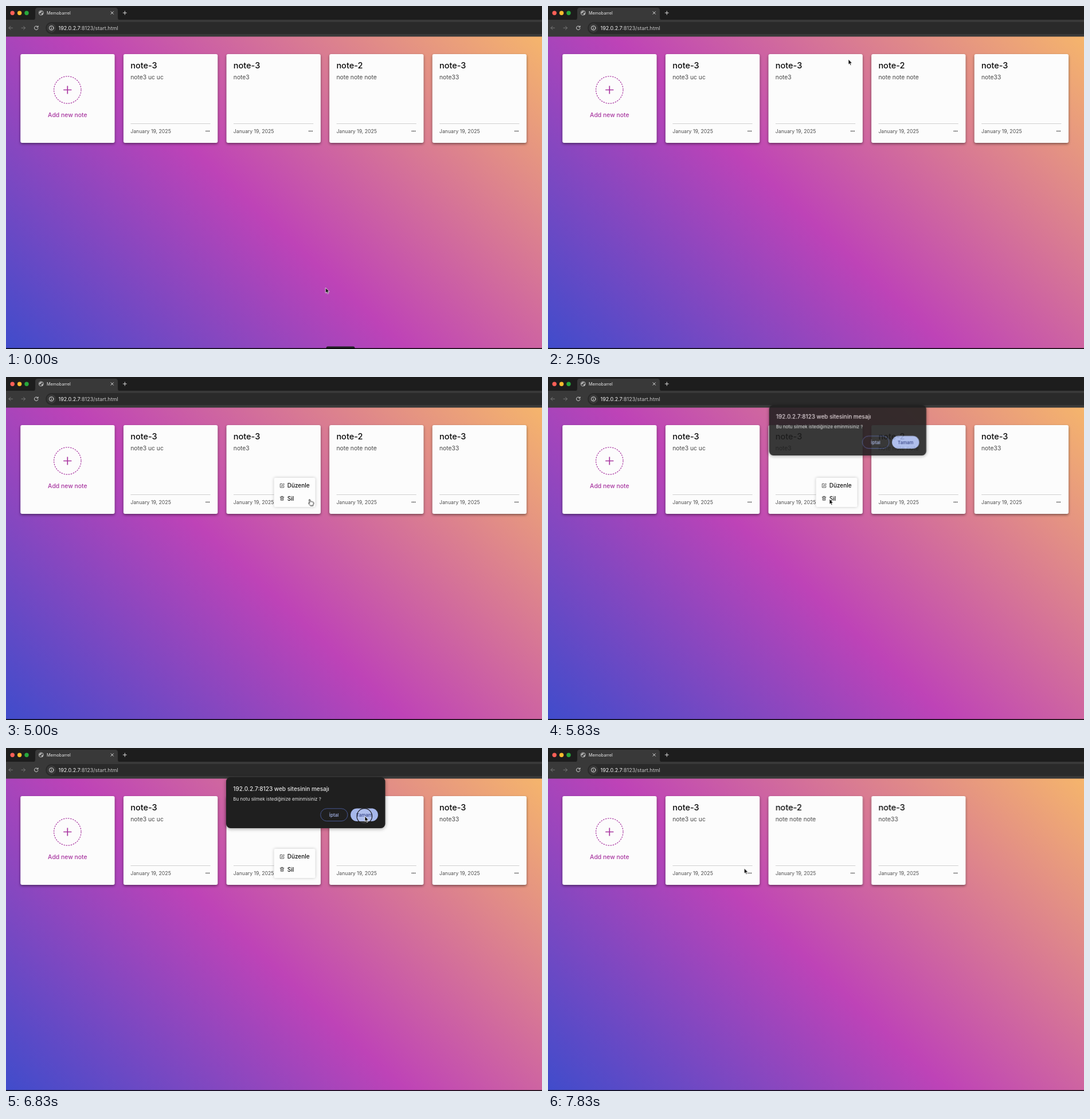
These frames come from a looping animation (935x599 px, 8 s). An HTML page:

```html
<!DOCTYPE html>
<html lang="tr">
<head>
<meta charset="utf-8">
<title>Memobarrel</title>
<style>
html, body { margin: 0; width: 100%; height: 100%; overflow: hidden; background: #050505; }
.page {
  position: absolute; left: 0; top: 53px; width: 935px; height: 545px;
  background: linear-gradient(43deg, #404ccb 0%, #be43b7 46%, #f5b56c 100%);
}
svg.stage { position: absolute; left: 0; top: 0; width: 935px; height: 599px; display: block; }
text { font-family: Inter, Roboto, "Noto Sans", sans-serif; }

/* Browser frame */
.tab { font-size: 7.3px; fill: #e6e6e6; }
.url { font-size: 9px; fill: #c4c4c4; }
.url .host { fill: #f2f2f2; }
.icon { fill: none; stroke: #dcdcdc; stroke-width: 1; stroke-linecap: round; stroke-linejoin: round; }
.dim { stroke: #777; }

/* Cards */
.paper { fill: #fcfcfc; filter: drop-shadow(0 2px 2px rgba(0, 0, 0, .45)); }
.title { font-size: 14.5px; font-weight: 500; fill: #0a0a0a; }
.body { font-size: 10.3px; fill: #484848; }
.date { font-size: 8.7px; fill: #4e4e4e; }
.add { font-size: 10.4px; font-weight: 500; fill: #a836a0; text-anchor: middle; }
.plus { fill: none; stroke: #a836a0; }

/* Menu */
.sheet { fill: #fdfdfd; filter: drop-shadow(0 0 2.5px rgba(0, 0, 0, .22)); }
.item { font-size: 10px; font-weight: 500; fill: #111; }
.mini { fill: none; stroke: #333; stroke-width: .8; stroke-linejoin: round; stroke-linecap: round; }

/* Dialog */
.box { fill: #1f1f1f; filter: drop-shadow(0 1px 3px rgba(0, 0, 0, .4)); }
.head { font-size: 10px; font-weight: 500; fill: #e4e4e4; }
.ask { font-size: 8px; fill: #e4e4e4; }
.btn { font-size: 8px; font-weight: 500; text-anchor: middle; }

/* Motion: 48 ticks per loop, a tick is 2.0833% */
.dock, .gone, .shift, .menu, .dialog, .move, .arrow, .hand, .ring {
  animation: 8s step-end -4ms infinite;
}
.dock { animation-name: dock; }
.gone { animation-name: gone; }
.shift { animation-name: shift; }
.menu { animation-name: menu; }
.dialog { animation-name: dialog; transform-origin: 523px 95px; }
.move { animation-name: move; }
.arrow { animation-name: arrow; }
.hand { animation-name: hand; }
.ring { animation-name: ring; }

@keyframes dock { 0% { opacity: 1 } 2.0833%, 100% { opacity: 0 } }
@keyframes gone { 0% { opacity: 1 } 87.5%, 100% { opacity: 0 } }
@keyframes shift {
  0% { transform: translate(0, 0) }
  87.5%, 100% { transform: translate(-179.6px, 0) }
}
@keyframes menu { 0% { opacity: 0 } 60.4167% { opacity: 1 } 87.5%, 100% { opacity: 0 } }
@keyframes dialog {
  0% { opacity: 0; transform: none }
  72.9167% { opacity: .89; transform: translate(0, -2.5px) scale(.988) }
  75% { opacity: 1; transform: none }
  87.5%, 100% { opacity: 0; transform: none }
}
@keyframes move {
  0% { transform: translate(557.5px, 492px) }
  31.25% { transform: translate(524px, 93px); animation-timing-function: steps(2) }
  35.4167% { transform: translate(529px, 168px); animation-timing-function: steps(3) }
  41.6667% { transform: translate(535px, 208px) }
  47.9167% { transform: translate(533px, 213px) }
  50% { transform: translate(531.3px, 217.5px) }
  60.4167% { transform: translate(530.5px, 215.5px) }
  62.5% { transform: translate(529.5px, 213.5px); animation-timing-function: steps(3) }
  68.75% { transform: translate(491px, 213px) }
  72.9167% { transform: translate(491px, 213px); animation-timing-function: steps(3) }
  79.1667% { transform: translate(626px, 119px) }
  87.5% { transform: translate(626px, 119px); animation-timing-function: steps(4) }
  95.8333% { transform: translate(342px, 205px) }
  97.9167%, 100% { transform: translate(342.3px, 210px) }
}
@keyframes arrow { 0% { opacity: 1 } 50% { opacity: 0 } 72.9167%, 100% { opacity: 1 } }
@keyframes hand { 0% { opacity: 0 } 50% { opacity: 1 } 72.9167%, 100% { opacity: 0 } }
@keyframes ring {
  0% { opacity: 0 }
  58.3333% { opacity: 1 }
  60.4167% { opacity: 0 }
  70.8333% { opacity: 1 }
  72.9167% { opacity: 0 }
  83.3333% { opacity: 1 }
  87.5%, 100% { opacity: 0 }
}
</style>
</head>
<body>
<div class="page"></div>
<svg class="stage" viewBox="0 0 935 599">
  <defs>
    <g id="paper"><rect class="paper" width="164.4" height="155" rx="3"/></g>
    <g id="note">
      <use href="#paper"/>
      <path d="M12.5 121.5H151.7" stroke="#c6c6c6" stroke-width=".8"/>
      <text class="date" x="12.3" y="138">January 19, 2025</text>
      <g fill="#505050">
        <circle cx="144.3" cy="134.5" r=".95"/>
        <circle cx="146.9" cy="134.5" r=".95"/>
        <circle cx="149.5" cy="134.5" r=".95"/>
      </g>
    </g>
  </defs>

  <!-- Browser frame -->
  <rect width="935" height="25" fill="#1d1d1d"/>
  <rect y="24" width="935" height="29.5" fill="#393939"/>
  <path d="M47 24.5Q51 24.5 51 20V7.500Q51 3 55.500 3H190.500Q195 3 195 7.500V20Q195 24.500 199 24.500Z" fill="#393939"/>
  <circle cx="11.200" cy="12.200" r="3.700" fill="#ff5f57"/>
  <circle cx="23.600" cy="12.200" r="3.700" fill="#febc2e"/>
  <circle cx="36" cy="12.200" r="3.700" fill="#28a93c"/>
  <circle cx="61.300" cy="12" r="4" fill="#4a4a4a" stroke="#bdbdbd" stroke-width=".9"/>
  <path d="M58 11Q60 8.500 62.500 8.800Q62.500 11 60.500 11.500Q60 13 58 12.500ZM62 13Q64 12 65 12.500Q64.500 15 62 15.500Z" fill="#bdbdbd"/>
  <text class="tab" x="71" y="14.500">Memobarrel</text>
  <path class="icon" d="M183 9.800l4.400 4.400m0-4.400l-4.400 4.400M204.300 12h6M207.300 9v6"/>
  <path class="icon dim" d="M11.500 38.300H5M8 35.300L5 38.300L8 41.300M27 38.300H33.500M30.500 35.300L33.500 38.300L30.500 41.300"/>
  <path class="icon" d="M55.600 36.500A3.300 3.300 0 1 0 56 39.200M56 34.800V37H53.800"/>
  <path d="M935 28H79.500a10.500 10.500 0 0 0 0 21H935Z" fill="#2a2a2a"/>
  <circle cx="79.200" cy="38.400" r="8" fill="#393939"/>
  <circle class="icon" cx="79.200" cy="38.400" r="3.700" stroke-width=".9"/>
  <path class="icon" d="M79.200 38.300v2M79.200 36.500v.1"/>
  <text class="url" x="91.500" y="41.600"><tspan class="host">192.0.2.7</tspan>:8123/start.html</text>

  <!-- Cards -->
  <g transform="translate(25.200 84)">
    <use href="#paper"/>
    <circle class="plus" cx="82.100" cy="62.500" r="23.700" stroke-width="1.200" stroke-dasharray="2.500 1.640"/>
    <path class="plus" d="M75 62.500h14.200M82.100 55.400v14.200" stroke-width="1.700"/>
    <text class="add" x="82.200" y="110">Add new note</text>
  </g>
  <g transform="translate(204.900 84)">
    <use href="#note"/>
    <text class="title" x="12.300" y="24.600">note-3</text>
    <text class="body" x="12.300" y="44">note3 uc uc</text>
  </g>
  <g class="gone">
    <g transform="translate(384.500 84)">
      <use href="#note"/>
      <text class="title" x="12.300" y="24.600">note-3</text>
      <text class="body" x="12.300" y="44">note3</text>
    </g>
  </g>
  <g class="shift">
    <g transform="translate(564.100 84)">
      <use href="#note"/>
      <text class="title" x="12.300" y="24.600">note-2</text>
      <text class="body" x="12.300" y="44">note note note</text>
    </g>
    <g transform="translate(743.700 84)">
      <use href="#note"/>
      <text class="title" x="12.300" y="24.600">note-3</text>
      <text class="body" x="12.300" y="44">note33</text>
    </g>
  </g>

  <g class="menu">
    <rect class="sheet" x="467.500" y="176" width="72" height="51" rx="2.500"/>
    <path class="mini" d="M481.500 186.500H478.300V193H484.700V190M480.800 190.800L481.200 189L484.300 185.900L485.500 187.100L482.500 190.300Z"/>
    <path class="mini" d="M478.200 209.700H484.800M480.300 209.500V208.300H482.700V209.500M479 209.800L479.300 215.300H483.700L484 209.800M480.700 211.300V213.800M482.300 211.300V213.800"/>
    <text class="item" x="490.700" y="193.100">Düzenle</text>
    <text class="item" x="490.700" y="215.600">Sil</text>
  </g>

  <g class="dialog">
    <rect class="box" x="384" y="51" width="277.500" height="89" rx="7.500"/>
    <text class="head" x="396.300" y="74.600">192.0.2.7:8123 web sitesinin mesajı</text>
    <text class="ask" x="396.300" y="92.300">Bu notu silmek istediğinize eminmisiniz ?</text>
    <rect x="548.700" y="105.800" width="47.200" height="21.800" rx="10.900" fill="none" stroke="#4a5c9c" stroke-width=".9"/>
    <text class="btn" x="572" y="119.600" fill="#a9b9ee">İptal</text>
    <rect x="601" y="105.400" width="48" height="22.600" rx="11.300" fill="#a6b7ea"/>
    <text class="btn" x="625" y="119.600" fill="#22307a">Tamam</text>
  </g>

  <!-- Pointer -->
  <rect class="dock" x="558.500" y="594.500" width="50" height="6" rx="3" fill="#242028"/>
  <rect y="597.500" width="935" height="1.500" fill="#050505"/>
  <g class="move">
    <circle class="ring" cx="-.7" cy="0" r="13.300" fill="rgba(255,255,255,.1)" stroke="#1c1c20" stroke-width="1.200"/>
    <path class="arrow" d="M0 0V9.300L2.100 7.500L3.500 10.700L5.100 10L3.700 6.900H6.500Z" fill="#080808" stroke="#fff" stroke-width=".8" stroke-linejoin="round"/>
    <path class="hand" d="M-1 1Q0-.6 1 1L1.900 4.200Q3 3.500 3.600 4.300Q4.700 3.700 5.200 4.600Q6.600 4.300 6.800 5.800Q7.300 8.200 6.300 9.700V11H1.300Q-.3 9.300-2 7.300Q-2.300 5.900-.8 6.300L.3 7.100Z" fill="#fff" stroke="#111" stroke-width=".9" stroke-linejoin="round"/>
  </g>
</svg>
</body>
</html>
```
